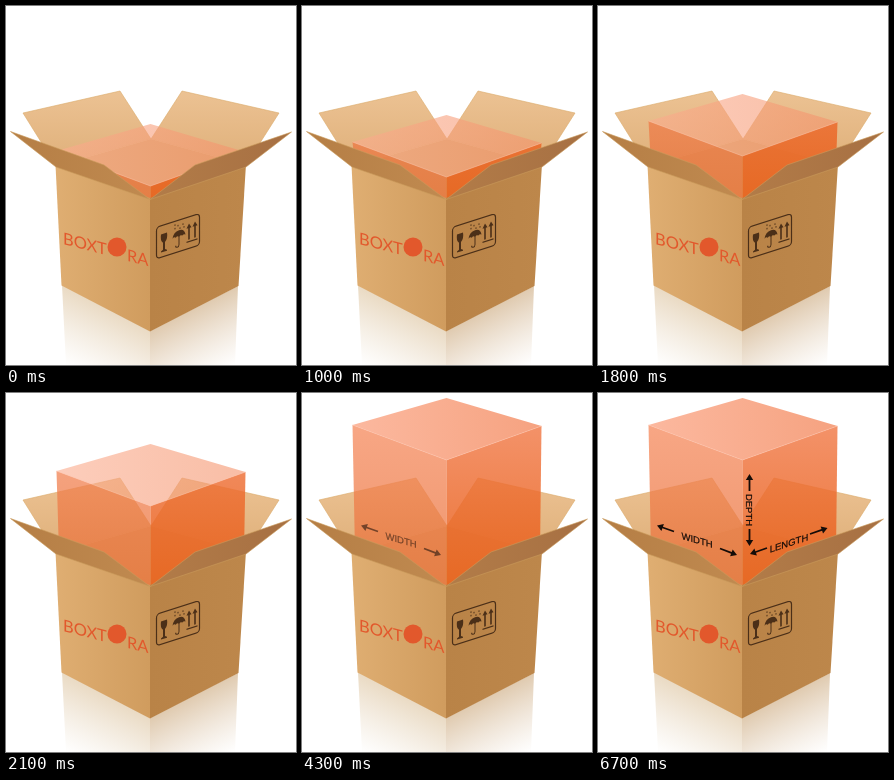
An HTML page that plays this animation: 290x359 px, repeating every 8 s.

```html
<!DOCTYPE html>
<html lang="en">
<head>
<meta charset="utf-8">
<title>Box dimensions</title>
<style>
html, body { margin: 0; width: 100%; height: 100%; overflow: hidden; background: #fff; }
svg { display: block; width: 100%; height: 100%; }
.label text { font: 9.5px "Liberation Sans", Arial, sans-serif; text-anchor: middle; fill: #150c08; stroke: #150c08; stroke-width: .2; }
.label path { fill: #150c08; }
.brand text { font: 16.5px Lato, sans-serif; fill: #e2582c; }
.icons { fill: none; stroke: #4b2f18; stroke-width: 1.2; }
.icons .solid { fill: #4b2f18; stroke: none; }
</style>
</head>
<body>
<svg viewBox="0 0 290 359">
  <defs>
    <linearGradient id="faceL"><stop stop-color="#dfae72"/><stop offset="1" stop-color="#d09c5e"/></linearGradient>
    <linearGradient id="faceR"><stop stop-color="#b98347"/><stop offset="1" stop-color="#bd874b"/></linearGradient>
    <linearGradient id="back" x1="0" y1="0" x2="0" y2="1"><stop stop-color="#ecc293"/><stop offset="1" stop-color="#dfb07a"/></linearGradient>
    <linearGradient id="frontL"><stop stop-color="#b57e45"/><stop offset="1" stop-color="#c08a50"/></linearGradient>
    <linearGradient id="frontR"><stop stop-color="#b27c48"/><stop offset="1" stop-color="#a77043"/></linearGradient>
    <linearGradient id="glassT"><stop stop-color="#fbac8e"/><stop offset="1" stop-color="#f4926a"/></linearGradient>
    <linearGradient id="glassL" gradientUnits="userSpaceOnUse" x1="0" y1="30" x2="0" y2="193">
      <stop stop-color="#f58455" stop-opacity=".72"/><stop offset="1" stop-color="#e87038" stop-opacity=".74"/></linearGradient>
    <linearGradient id="glassR" gradientUnits="userSpaceOnUse" x1="0" y1="30" x2="0" y2="193">
      <stop stop-color="#f0703a" stop-opacity=".76"/><stop offset="1" stop-color="#e8621c" stop-opacity=".9"/></linearGradient>
    <linearGradient id="mirrorL" gradientUnits="userSpaceOnUse" x1="100" y1="302" x2="68" y2="364">
      <stop stop-color="#d6b88c" stop-opacity=".52"/><stop offset="1" stop-color="#dcc6a4" stop-opacity="0"/></linearGradient>
    <linearGradient id="mirrorR" gradientUnits="userSpaceOnUse" x1="188" y1="302" x2="220" y2="364">
      <stop stop-color="#c49c6a" stop-opacity=".54"/><stop offset="1" stop-color="#d4b794" stop-opacity="0"/></linearGradient>
  </defs>

  <polygon points="56,279 144,325 144,359 60,359" fill="url(#mirrorL)"/>
  <polygon points="144,325 232,280 229,359 144,359" fill="url(#mirrorR)"/>

  <polygon points="50,160 145,133 240,159 144,193" fill="#daa970"/>
  <g fill="url(#back)" stroke="#dba968" stroke-width=".6">
    <polygon points="17,107 114,85 145,133 50,160"/>
    <polygon points="176,85 273,107 240,159 145,133"/>
  </g>

  <polygon id="left" fill="url(#glassL)"/>
  <polygon id="right" fill="url(#glassR)"/>
  <polygon id="top" fill="url(#glassT)"/>
  <polyline id="rim" fill="none" stroke="#fcc3aa" stroke-width=".8" stroke-opacity=".6"/>

  <polygon points="49.500,159 144,192 144,325.500 55.500,279.500" fill="url(#faceL)"/>
  <polygon points="144,192 240,158 232.500,280 144,325.500" fill="url(#faceR)"/>
  <g stroke="#c99a5c" stroke-width=".6">
    <polygon points="4.500,125.500 98,159 144,193.500 50,161" fill="url(#frontL)"/>
    <polygon points="285.500,126 189,159 144,193.500 240,161" fill="url(#frontR)"/>
  </g>

  <g class="brand">
    <g transform="matrix(1 .26 0 1 57 238)">
      <text>BOXT</text>
      <text x="64">RA</text>
    </g>
    <circle cx="111" cy="241" r="9.5" fill="#e2582c"/>
  </g>

  <g class="icons" transform="matrix(1 -.32 0 1 150 221)">
    <rect x=".5" y=".5" width="43" height="31.500" rx="3.500"/>
    <path class="solid" d="M5 9h6q1 6-2 9v7l2 1.200v1h-6v-1l2-1.200v-7q-3-3-2-9z"/>
    <path class="solid" d="M16.500 17q1-6.500 6.500-6.500t6.500 6.500q-1.600-1.500-3.200 0q-1.600-1.500-3.300 0q-1.600-1.500-3.300 0q-1.600-1.500-3.200 0z"/>
    <path d="M23 16v9q0 2-1.700 2t-1.700-2" stroke-width="1"/>
    <path d="M19 7v1.500M22 5v1.500M24 8v1.500M27 5v1.500M28 8v1.500M19 3.500v1.500" stroke-width="1"/>
    <path class="solid" d="M33 7l2.500 4.500h-1.700v11.500h-1.600v-11.500h-1.700zM39 7l2.500 4.500h-1.700v11.500h-1.600v-11.500h-1.700zM30.500 24.500h11v1.300h-11z"/>
  </g>

  <g class="label" id="width">
    <text transform="matrix(1 .29 0 1 99 150.500)">WIDTH</text>
  </g>
  <g class="label" id="depth">
    <text transform="translate(148.300 117) rotate(90)">DEPTH</text>
  </g>
  <g class="label" id="length">
    <text transform="matrix(1 -.33 0 1 191 153.500)">LENGTH</text>
  </g>
</svg>
<script>
const LOOP = 8000, STEP = 100;
const $ = id => document.getElementById(id);

// time and height of the top corner
const rise = [[400, 118], [1000, 109], [1300, 104], [1600, 96], [1800, 88],
  [1900, 79], [2000, 67], [2100, 51], [2200, 22], [2300, 5]];
const tint = [[2100, .6], [2300, .85]];
const labels = { width: 4300, depth: 5500, length: 6600 };

function track(keys, t) {
  if (t <= keys[0][0]) return keys[0][1];
  for (let i = 1; i < keys.length; i++) {
    const [a, u] = keys[i - 1], [b, v] = keys[i];
    if (t <= b) return u + (v - u) * (t - a) / (b - a);
  }
  return keys[keys.length - 1][1];
}

function arrow(id, x, y, tx, ty) {
  const len = Math.hypot(tx - x, ty - y);
  const angle = Math.atan2(ty - y, tx - x) * 180 / Math.PI;
  const p = document.createElementNS("http://www.w3.org/2000/svg", "path");
  p.setAttribute("d", `M0-.9H${len - 6}V-3.700L${len} 0L${len - 6} 3.700V.9H0Z`);
  p.setAttribute("transform", `translate(${x} ${y}) rotate(${angle})`);
  $(id).append(p);
}
arrow("width", 76, 138.5, 59, 132.5);
arrow("width", 122, 155.5, 139, 162);
arrow("depth", 151.5, 98, 151.5, 81);
arrow("depth", 151.5, 136, 151.5, 153);
arrow("length", 169, 155, 152, 161);
arrow("length", 212, 141, 229.5, 135);

function draw(time) {
  const t = Math.floor(time % LOOP / STEP) * STEP;
  const y = track(rise, t);
  const l = `50.5,${y + 27}`, f = `144.5,${y + 62}`, r = `239.5,${y + 28}`;
  const set = (id, pts) => $(id).setAttribute("points", pts);
  set("left", `${l} ${f} 144.5,193 53,160`);
  set("right", `${f} ${r} 238,160 144.5,193`);
  set("top", `144.5,${y} ${r} ${f} ${l}`);
  set("rim", `${l} ${f} ${r}`);
  $("top").setAttribute("fill-opacity", track(tint, t));
  for (const id in labels) {
    const age = t - labels[id];
    $(id).setAttribute("opacity", age < 0 ? 0 : age < STEP ? .55 : 1);
  }
}

const start = performance.now();
function tick() {
  draw(performance.now() - start);
  requestAnimationFrame(tick);
}
tick();
</script>
</body>
</html>
```
